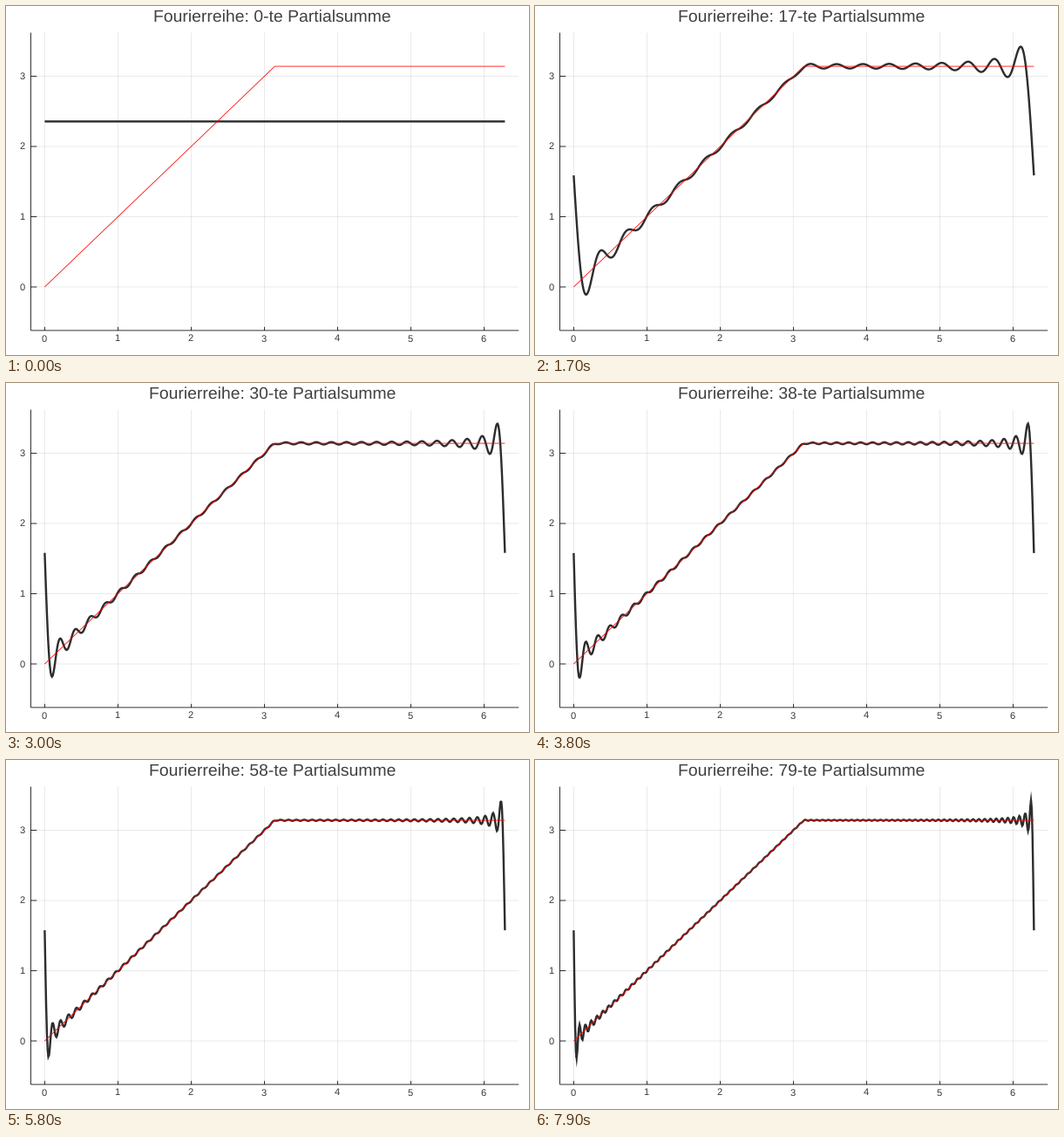
A matplotlib script for the animation above (8000 ms loop, 600 by 400 pixels).

```python
import numpy as np
import matplotlib.pyplot as plt
from matplotlib.animation import FuncAnimation
from matplotlib.collections import PolyCollection

plt.rcParams.update({
    "font.family": "Liberation Sans",
    "path.simplify": False,
    "text.hinting": "none",
})

W, H, DPI = 600, 400, 100
PX = 72 / DPI                 # points per pixel
FRAMES, STEP_MS = 80, 100
X_PAD = 0.03 * 2 * np.pi
Y_MIN, Y_MAX = -0.62, 3.62
THIN, THICK = 0.8, 2.4        # line widths in pixels
TICK = 0.012                  # tick length as a share of the axis
CURVE, TITLE, LABEL = "#2d2d2d", "#404040", "#363636"


def to_x(x):
    return 44.4 + 84.03 * np.asarray(x)


def to_y(y):
    return 322 - 80.5 * np.asarray(y)


LEFT, RIGHT = to_x(-X_PAD), to_x(2 * np.pi + X_PAD)
TOP, BOTTOM = to_y(Y_MAX), to_y(Y_MIN)

fig = plt.figure(figsize=(W / DPI, H / DPI), dpi=DPI, facecolor="white")
ax = fig.add_axes([0, 0, 1, 1])
ax.set_xlim(0, W)
ax.set_ylim(H, 0)
ax.axis("off")


def stroke(xs, ys, color, width=THIN, **kw):
    return ax.plot(xs, ys, color=color, lw=width * PX, snap=False,
                   solid_capstyle="butt", **kw)[0]


def label(x, y, text, size=11.1, color=LABEL, ha="center"):
    return ax.text(x, y, text, fontsize=size * PX, color=color,
                   ha=ha, va="baseline")


x_tick = TICK * (BOTTOM - TOP)
y_tick = TICK * (RIGHT - LEFT)
for k in range(7):
    gx = to_x(k)
    stroke([gx, gx], [TOP, BOTTOM], "black", alpha=0.1)
    stroke([gx, gx], [BOTTOM, BOTTOM - x_tick], "black")
    label(gx - 0.7, 384.4, str(k))
for k in range(4):
    gy = to_y(k)
    stroke([LEFT, RIGHT], [gy, gy], "black", alpha=0.1)
    stroke([LEFT, LEFT + y_tick], [gy, gy], "black")
    label(21.6, gy + 3.4, str(k), ha="right")
stroke([LEFT, LEFT], [TOP, BOTTOM], "black")
stroke([LEFT, RIGHT], [BOTTOM, BOTTOM], "black")

title = label(305.7, 18, "", 19.4, TITLE)

t = np.linspace(0, 2 * np.pi, 629)
px = to_x(t)
curve = stroke(px, px, CURVE, THICK, solid_joinstyle="miter", zorder=3)
spikes = PolyCollection([], facecolor=CURVE, edgecolor="none", zorder=3)
ax.add_collection(spikes)
stroke(to_x([0, np.pi, 2 * np.pi]), to_y([0, np.pi, np.pi]), "red", zorder=4)


def partial_sum(n):
    s = np.full_like(t, 3 * np.pi / 4)
    for k in range(1, n + 1):
        s -= np.sin(k * t) / k
        if k % 2:
            s -= 2 / (np.pi * k * k) * np.cos(k * t)
    return s


def miter_tips(x, y):
    """Pointed joins too sharp for the renderer's own miter limit."""
    d = np.column_stack([np.diff(x), np.diff(y)])
    d /= np.hypot(d[:, 0], d[:, 1])[:, None]
    normal = np.column_stack([-d[:, 1], d[:, 0]])
    tips = []
    for i in range(len(d) - 1):
        a, b = normal[i], normal[i + 1]
        c = 1 + a @ b
        ratio = np.sqrt(2 / max(c, 1e-9))
        if not 3.5 < ratio < 10:
            continue
        turn = d[i, 0] * d[i + 1, 1] - d[i, 1] * d[i + 1, 0]
        r = -np.sign(turn) * THICK / 2
        p = np.array([x[i + 1], y[i + 1]])
        tips.append([p, p + r * a, p + r * (a + b) / c, p + r * b])
    return tips


def draw(n):
    y = to_y(partial_sum(n))
    curve.set_ydata(y)
    spikes.set_verts(miter_tips(px, y))
    title.set_text(f"Fourierreihe: {n}-te Partialsumme")
    return curve, spikes, title


anim = FuncAnimation(fig, draw, frames=FRAMES, interval=STEP_MS,
                     repeat=True, repeat_delay=0, blit=False)
plt.show()
```
